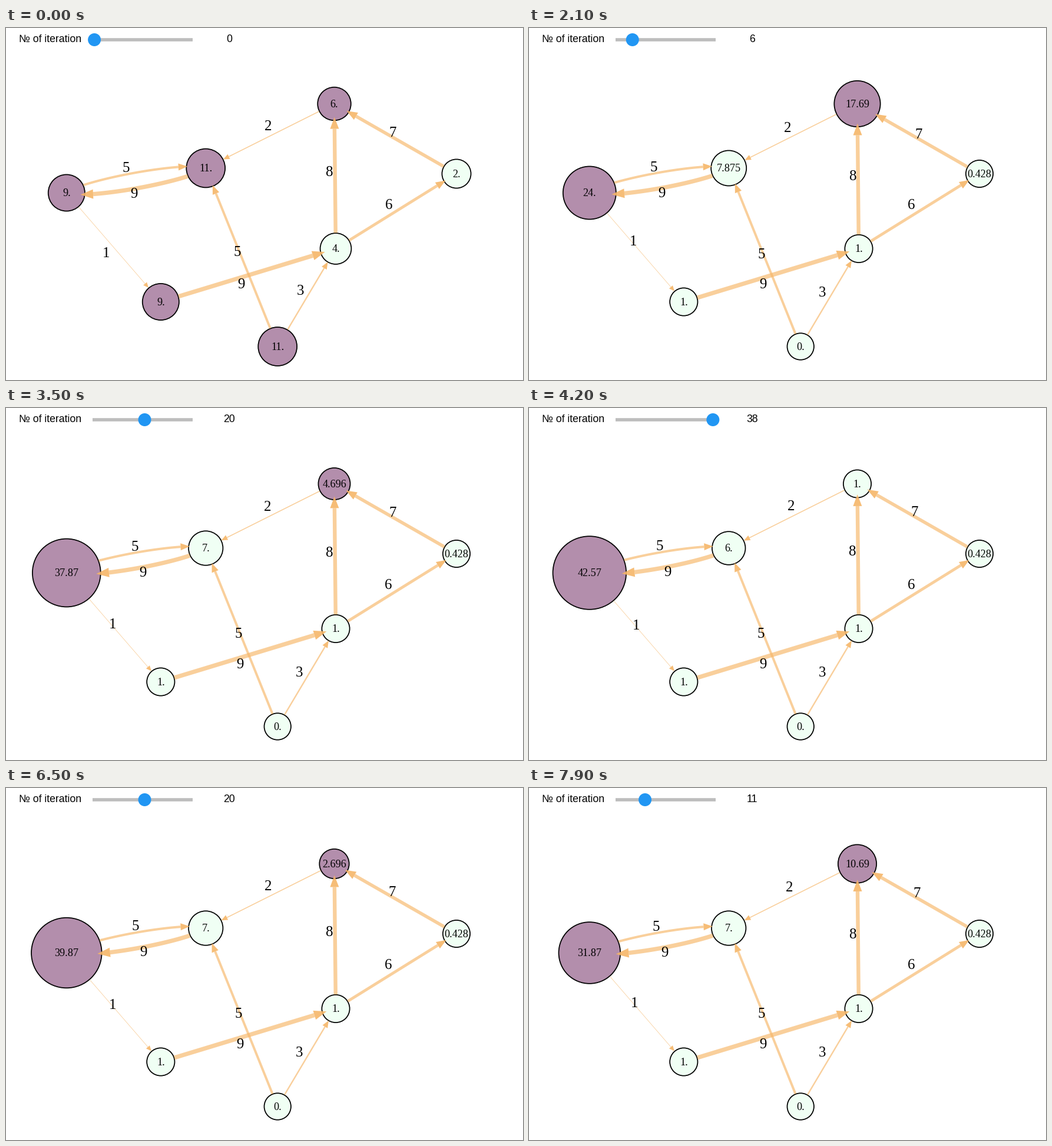
These frames come from a looping animation (878x599 px, 8000 ms). A matplotlib script:

```python
import numpy as np
import matplotlib.pyplot as plt
from matplotlib.animation import FuncAnimation
from matplotlib.patches import Circle

W, H, DPI = 878, 599, 64
PT = 72 / DPI  # points per pixel
FRAMES, INTERVAL = 80, 100

PURPLE, MINT = "#b38eac", "#f0fff4"
ORANGE = (246 / 255, 182 / 255, 104 / 255)
BLUE, GRAY = "#2196f3", "#bdbdbd"

# node: (x, y, starting resource)
NODES = {
    "A": (102.8, 280.5, 9), "B": (339.2, 238.5, 11), "C": (557.5, 129, 6),
    "D": (765, 248, 2), "E": (560, 375.5, 4), "F": (262.8, 466, 9),
    "G": (461.2, 542, 11),
}

# source, target, capacity, bend, label offset from the visible middle
EDGES = [
    ("A", "B", 5, -13.5, (-16, -9.5)),
    ("B", "A", 9, 13.5, (0, 7.3)),
    ("A", "F", 1, 0, (-13, 8)),
    ("C", "B", 2, 0, (-5, -17)),
    ("D", "C", 7, 0, (-4.5, -12)),
    ("E", "C", 8, 0, (-9, -6.3)),
    ("E", "D", 6, 0, (-15, -10.7)),
    ("F", "E", 9, 0, (-17.5, 15.2)),
    ("G", "B", 5, 0, (-6.6, -9.2)),
    ("G", "E", 3, 0, (-12.5, -9.8)),
]
CAPACITY = {n: sum(e[2] for e in EDGES if e[0] == n) for n in NODES}


def step(state):
    """Each node sends its full capacity, or all it has in proportion."""
    new = dict(state)
    for src, dst, weight, *_ in EDGES:
        flow = weight * min(1, state[src] / CAPACITY[src])
        new[src] -= flow
        new[dst] += flow
    return new


STATES = [{n: v[2] for n, v in NODES.items()}]
for _ in range(40):
    STATES.append(step(STATES[-1]))

# Frame at which the slider or the graph changes: (slider, graph iteration)
TIMELINE = {
    0: (0, 0), 5: (1, 0), 6: (1, 1), 9: (2, 2), 12: (3, 2), 13: (3, 3),
    16: (4, 4), 19: (5, 5), 21: (6, 5), 22: (6, 6), 25: (7, 7),
    40: (32, 30), 41: (35, 33), 42: (38, 36), 43: (40, 38), 50: (38, 38),
    65: (20, 20), 67: (19, 20), 68: (19, 19), 69: (18, 19), 70: (18, 18),
    71: (17, 18), 72: (17, 17), 77: (15, 16), 78: (13, 14), 79: (11, 12),
}
for k, pos in enumerate((10, 13, 15, 18, 20, 22, 24, 27, 29)):
    TIMELINE[31 + k] = (pos, pos - 2)
for k in range(8):
    TIMELINE[56 + k] = (36 - 2 * k, 36 - 2 * k)

fig = plt.figure(figsize=(W / DPI, H / DPI), dpi=DPI, facecolor="white")
ax = fig.add_axes([0, 0, 1, 1])


def text(x, baseline, s, size, family="Liberation Serif", ha="center"):
    ax.text(x, baseline, s, fontsize=size * PT, family=family, ha=ha,
            va="baseline", color="black", zorder=6)


def radius(value):
    return 22.7 + 0.93 * value


def number(value):
    return f"{value + 1e-9:.9f}"[:5].rstrip("0")


def draw_slider(pos):
    text(22, 24, "№ of iteration", 17.6, "Liberation Sans", "left")
    text(379, 24, str(pos), 17.6, "Liberation Sans")
    ax.plot([147, 317], [19.8, 19.8], color=GRAY, lw=5.6 * PT,
            solid_capstyle="butt")
    ax.add_patch(Circle((150.1 + 4.27 * pos, 20), 11, fc=BLUE, lw=0, zorder=3))


def draw_node(name, value):
    x, y, _ = NODES[name]
    fill = PURPLE if value >= CAPACITY[name] else MINT
    ax.add_patch(Circle((x, y), radius(value), fc=fill, ec="black",
                        lw=1.75 * PT, zorder=2))
    text(x, y + 5.6, number(value), 18.1)


def draw_edge(state, src, dst, weight, bend, offset):
    start, end = (np.array(NODES[n][:2]) for n in (src, dst))

    def point(u):
        u = np.asarray(u, float)[..., None]
        curve = bend * (4 * u * (1 - u)) ** 0.6
        return start + (end - start) * u + curve * np.array([0, 1])

    grid = np.linspace(0, 1, 400)
    from_src = np.hypot(*(point(grid) - start).T)
    to_dst = np.hypot(*(point(grid) - end).T)

    def at_target(dist):
        return np.interp(-dist, -to_dst, grid)

    u_start = np.interp(radius(state[src]) + 0.6, from_src, grid)
    reach = radius(state[dst]) + 0.8 - 0.1 * weight ** 2
    length = 7.5 + 1.55 * weight
    u_tip, u_base = at_target(reach), at_target(reach + length)

    shaft = point(np.linspace(u_start, u_base, 40))
    ax.plot(*shaft.T, color=ORANGE, alpha=0.66, lw=0.8 * weight * PT,
            solid_capstyle="butt", zorder=4)
    tip, base = point(u_tip), point(u_base)
    along = (tip - base) / np.hypot(*(tip - base))
    side = np.array([-along[1], along[0]]) * (7 + weight) / 2
    ax.fill(*np.array([tip, base + side, base - side]).T, color=ORANGE,
            alpha=0.9, lw=0, zorder=5)

    label = point((u_start + u_tip) / 2) + offset
    if (src, dst) == ("A", "F") and state["A"] > 22:
        label = label - [0, 27.5]
    text(label[0], label[1] + 8.4, str(weight), 25)


def draw(frame):
    ax.clear()
    ax.set_xlim(0, W)
    ax.set_ylim(H, 0)
    ax.axis("off")
    pos, iteration = TIMELINE[max(k for k in TIMELINE if k <= frame)]
    state = STATES[iteration]
    draw_slider(pos)
    for name, value in state.items():
        draw_node(name, value)
    for edge in EDGES:
        draw_edge(state, *edge)
    return []


anim = FuncAnimation(fig, draw, frames=FRAMES, interval=INTERVAL,
                     repeat=True, repeat_delay=0, init_func=lambda: draw(0))
plt.show()
```
